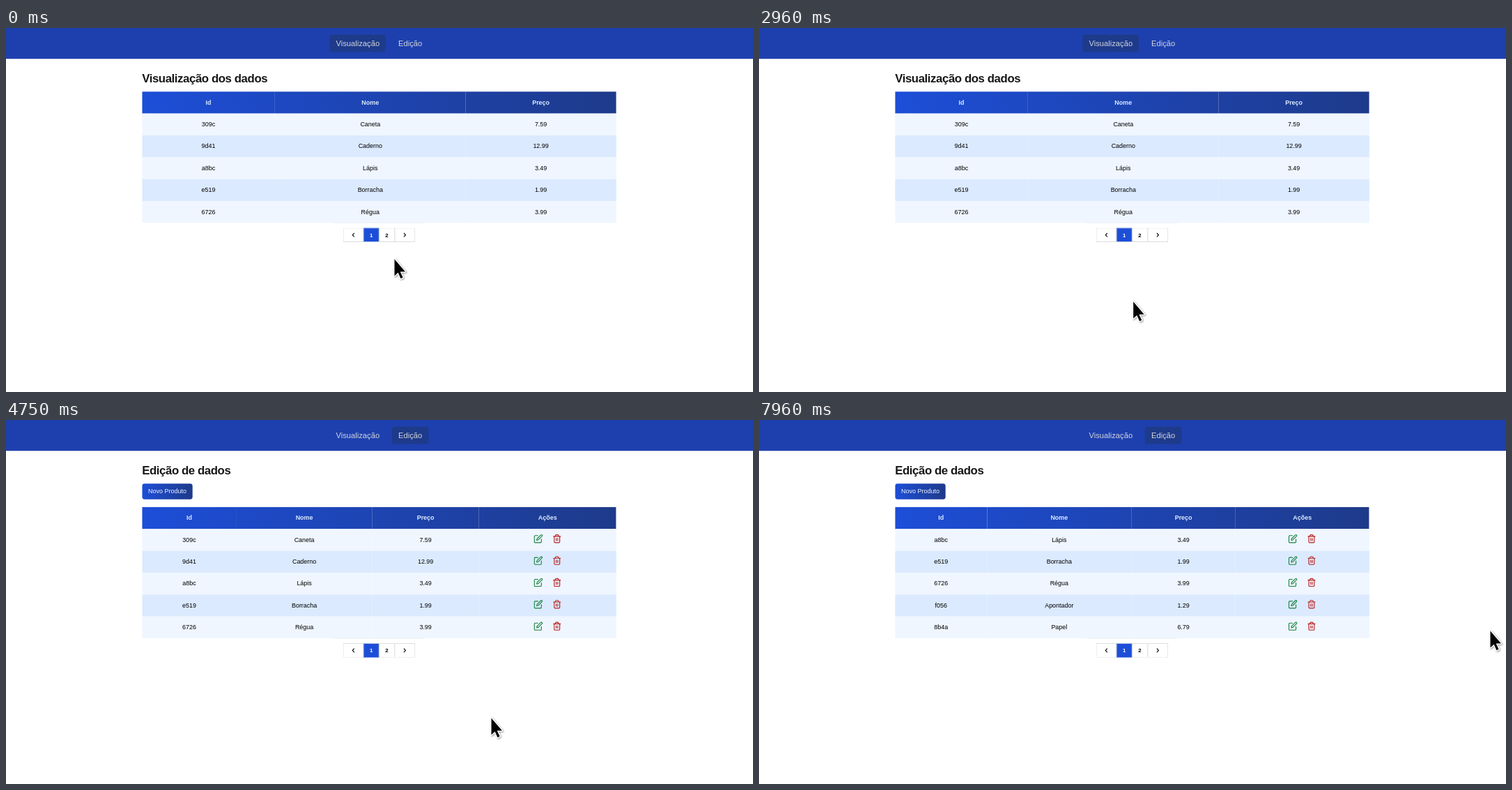
Animation of 1072x522 px, one loop 8000 ms. Source, as an HTML page:

```html
<!DOCTYPE html>
<html lang="pt-BR">
<head>
<meta charset="utf-8">
<title>Produtos</title>
<style>
html, body { margin: 0; width: 100%; height: 100%; overflow: hidden; background: #fff; }
#stage { position: absolute; left: 0; top: 0; width: 1072px; height: 522px; overflow: hidden; }
#page {
  position: absolute; width: 1915px; height: 933px; transform: scale(.56); transform-origin: 0 0;
  font: 16px/24px "Liberation Sans", Arial, sans-serif; color: #000;
}
nav {
  position: absolute; left: 0; top: 0; width: 1912px; height: 61.5px; padding-top: 17px; padding-right: 3px;
  background: #1e40af; display: flex; justify-content: center; align-items: flex-start; gap: 16px;
}
nav span { padding: 8px 16px; border-radius: 7px; font-size: 20px; line-height: 28px; color: #d1d5db; }
nav .active { background: #1e3a8a; }
nav .hover { background: #1d4ed8; color: #fff; }
main { position: absolute; left: 348.5px; top: 110.6px; width: 1215px; }
h1 { margin: 0 0 16px; font-size: 30px; line-height: 36px; letter-spacing: -.025em; color: #171717; }
.new {
  width: max-content; padding: 8px 16px; margin-bottom: 20px; border-radius: 6px;
  color: #eff6ff; background: linear-gradient(to right, #1d4ed8, #1e3a8a);
}
table { width: 100%; border-spacing: 0; border-collapse: collapse; text-align: center; }
thead tr { background: linear-gradient(to right, #1d4ed8, #1e3a8a); color: #dbeafe; }
th, td { padding: 16px; }
tbody tr { background: #eff6ff; }
tbody tr:nth-child(even) { background: #dbeafe; }
td.actions { padding: 0; }
.actions div { position: relative; top: -3px; width: 98px; height: 40px; margin: 0 auto; display: flex; justify-content: center; gap: 8px; }
.actions span { width: 24px; height: 24px; padding: 8px; border-radius: 50%; }
.actions .hover { background: #93c5fd; }
svg { display: block; fill: none; stroke: currentColor; stroke-width: 2; stroke-linecap: round; stroke-linejoin: round; }
.pager { width: 184px; margin: 0 auto; padding: 12px 24px; border-top: 1px solid #e5e7eb; display: flex; }
.pager span {
  box-sizing: border-box; width: 40px; height: 36px; display: flex; align-items: center; justify-content: center;
  font-size: 14px; font-weight: bold; box-shadow: inset 0 0 0 1px #d1d5db, 0 1px 2px rgba(0,0,0,.06);
}
.pager .arrow { width: 52px; }
.pager .hover { background: #2563eb; color: #fff; }
.pager .active { background: #1d4ed8; color: #fff; }
.status {
  position: absolute; left: 0; top: 911px; width: 177px; height: 22px; padding-left: 1px; border-radius: 0 5px 0 0;
  background: #1c1f26; color: #d3dfe8; font: 15px/25px "Noto Sans", sans-serif;
}
#cursor { position: absolute; left: 0; top: 0; width: 1px; height: 1px; overflow: visible; stroke: none;
  filter: drop-shadow(1px 1.5px 1px rgba(0,0,0,.4)); }
#cursor path { fill: #000; stroke: #fff; stroke-width: 2.8; paint-order: stroke; }
</style>
</head>
<body>
<div id="stage">
  <div id="page"></div>
  <svg id="cursor">
    <path id="pointer" d="M.5 .5V24.5L5.6 19.8L9.5 28.3L12.6 26.8L8.7 18.6H16Z"/>
    <path id="hand" d="M-1.5 1.2Q0-1 1.5 1.2V8Q4 7 5.3 8.8Q8 7.6 9.4 9.4Q12.6 8.8 13.6 11.8L13.4 17.5L12.4 21.5H-2.5L-3.4 18.6L-6 14.4Q-6.4 11.2-3.8 12.2L-1.5 14Z"/>
  </svg>
</div>
<script>
const DURATION = 8000, FPS = 24;
const $ = id => document.getElementById(id);

const products = [
  "309c,Caneta,7.59", "9d41,Caderno,12.99", "a8bc,Lápis,3.49",
  "e519,Borracha,1.99", "6726,Régua,3.99", "f056,Apontador,1.29",
  "8b4a,Papel,6.79", "df19,Tesoura,8.99", "a1ad,Corretivo especial,4.29"
].map(line => line.split(","));

// time, editing?, first product, row count, page number
const scenes = [
  [0, false, 0, 5, 1], [1540, false, 5, 4, 2], [2580, false, 0, 5, 1], [4130, true, 0, 5, 1],
  [6630, true, 1, 4, 1], [6710, true, 1, 5, 1], [7880, true, 2, 4, 1], [7960, true, 2, 5, 1]
];

const hovers = [
  [0, ""], [750, "next"], [1540, ""], [1880, "1"], [2000, "prev"], [2580, ""], [3330, "edit"], [4210, ""],
  [5630, "trash0"], [5830, "trash1"], [6000, "trash0"], [6750, ""], [7500, "trash0"], [7880, ""]
];

// start, end, then the points passed at even intervals
const moves = [
  [540, 830, [563, 314], [573, 300], [577, 295]],
  [960, 1000, [578, 295]],
  [1500, 1660, [572, 336]],
  [1660, 1920, [548, 296], [510.5, 270]],
  [1920, 2080, [499, 265]],
  [2540, 2920, [503, 310], [532, 414]],
  [2920, 3380, [550, 330], [562, 120], [568, 15]],
  [3420, 3540, [569, 15]],
  [3710, 3830, [569, 14]],
  [4130, 4750, [600, 90], [672, 330], [696, 427]],
  [4750, 4920, [698, 336]],
  [5000, 5460, [735, 270], [819, 190]],
  [5460, 5670, [795, 175]],
  [5750, 5830, [793, 195]],
  [5880, 6130, [791, 172]],
  [6670, 6920, [815, 185], [870, 212], [909, 227]],
  [7130, 7580, [850, 195], [794, 171]],
  [7840, 7880, [840, 195]],
  [7920, 7960, [1049, 302]]
];

const at = (list, time) => list.findLast(item => item[0] <= time);
const icon = (size, color, d) =>
  `<svg width="${size}" height="${size}" viewBox="0 0 ${size} ${size}" style="color:${color}"><path d="${d}"/></svg>`;
const pencil = icon(24, "#15803d", "M11 4H4a2 2 0 0 0-2 2v14a2 2 0 0 0 2 2h14a2 2 0 0 0 2-2v-7M18.5 2.5a2.12 2.12 0 0 1 3 3L12 15l-4 1 1-4z");
const trash = icon(24, "#b91c1c", "M3 6h18M19 6v14a2 2 0 0 1-2 2H7a2 2 0 0 1-2-2V6M8 6V4a2 2 0 0 1 2-2h4a2 2 0 0 1 2 2v2M10 11v6M14 11v6");
const chevron = side => icon(20, "inherit", side < 0 ? "M12 5.7L8 10L12 14.3" : "M8 5.7L12 10L8 14.3");

function pageHTML([, editing, first, count, current], hover, status) {
  const item = (name, content, active, kind = "") =>
    `<span class="${kind} ${active ? "active" : hover === name ? "hover" : ""}">${content}</span>`;
  const heads = ["Id", "Nome", "Preço", ...(editing ? ["Ações"] : [])];
  const rows = products.slice(first, first + count).map((product, i) =>
    `<tr>${product.map(value => `<td>${value}</td>`).join("")}${editing
      ? `<td class="actions"><div>${item("pencil" + i, pencil)}${item("trash" + i, trash)}</div></td>` : ""}</tr>`);
  return `<nav>${item("view", "Visualização", !editing)}${item("edit", "Edição", editing)}</nav>
    <main>
      <h1>${editing ? "Edição de dados" : "Visualização dos dados"}</h1>
      ${editing ? '<div class="new">Novo Produto</div>' : ""}
      <table>
        <thead><tr>${heads.map(head => `<th>${head}</th>`).join("")}</tr></thead>
        <tbody>${rows.join("")}</tbody>
      </table>
      <div class="pager">${item("prev", chevron(-1), false, "arrow")}${item("1", "1", current === 1)}${
        item("2", "2", current === 2)}${item("next", chevron(1), false, "arrow")}</div>
    </main>
    ${status ? '<div class="status">localhost:3000/edicao</div>' : ""}`;
}

function cursorAt(time) {
  let position = [557, 331];
  for (const [start, end, ...points] of moves) {
    if (time < start) break;
    const stops = [position, ...points];
    const progress = Math.min((time - start) / (end - start), 1) * points.length;
    const i = Math.min(Math.floor(progress), points.length - 1);
    position = stops[i].map((value, axis) => value + (stops[i + 1][axis] - value) * (progress - i));
  }
  return position;
}

let shown = "";
function draw(now) {
  const tick = Math.min(Math.floor((now % DURATION + 5) * FPS / 1000), DURATION * FPS / 1000 - 1);
  const time = Math.round(tick * 100 / FPS) * 10;
  const hover = at(hovers, time)[1];
  const html = pageHTML(at(scenes, time), hover, time >= 3750 && time < 4300);
  if (html !== shown) $("page").innerHTML = shown = html;
  const [x, y] = cursorAt(time);
  $("cursor").style.transform = `translate(${x}px, ${y}px)`;
  $("hand").style.display = hover ? "" : "none";
  $("pointer").style.display = hover ? "none" : "";
}

const start = performance.now();
function loop() {
  draw(performance.now() - start);
  requestAnimationFrame(loop);
}
loop();
</script>
</body>
</html>
```
